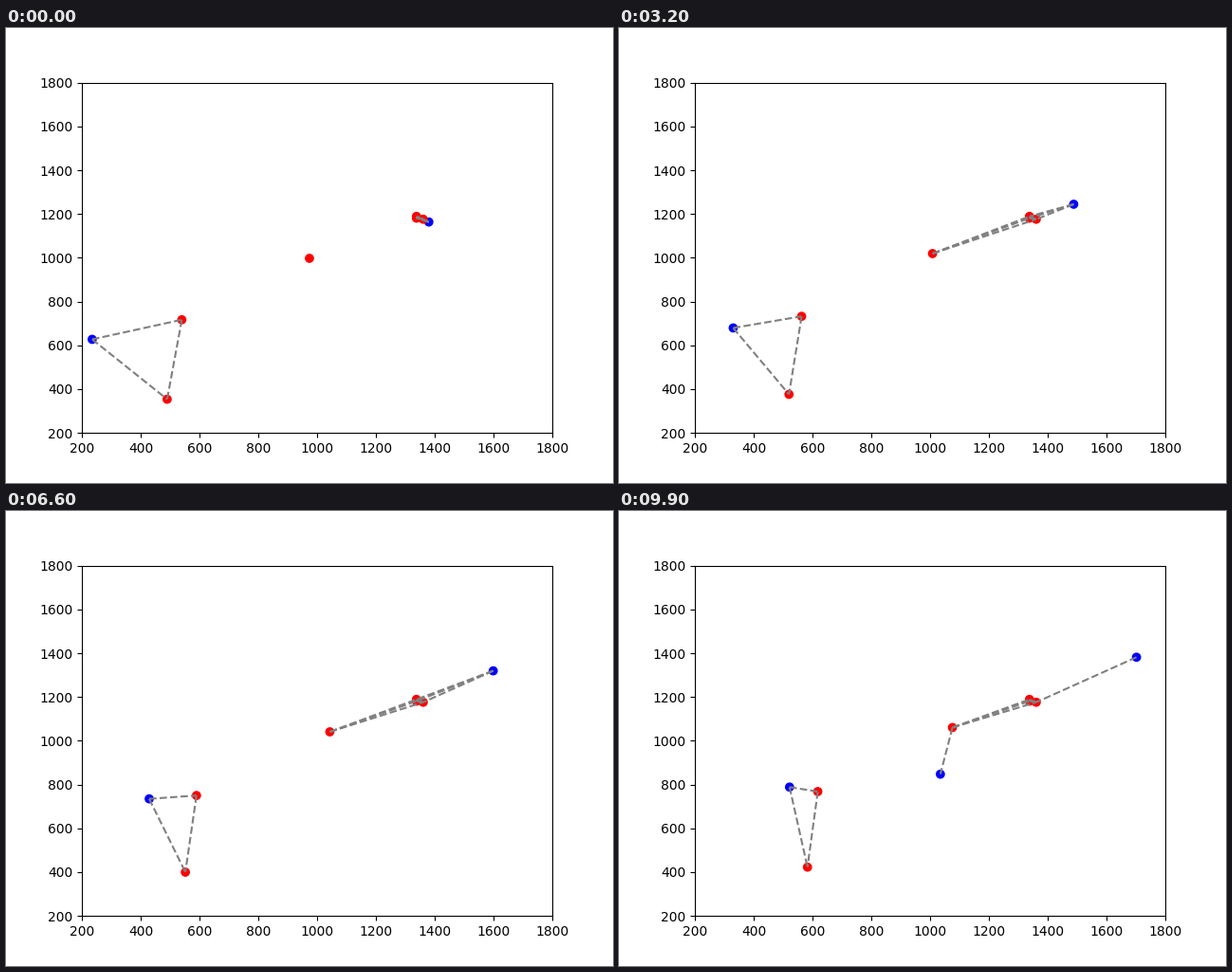
Recreate the animation shown at these times as a matplotlib script. Size 640 by 480 pixels, loop 10000 ms.

```python
from itertools import combinations

import matplotlib.pyplot as plt
import numpy as np
from matplotlib.animation import FuncAnimation

FRAMES = 100
RANGE = 400        # nodes closer than this are linked
JOIN = 94          # step at which the late node appears


def node(color, start, end=None, bow=(0, 0)):
    """A node going from start to end, its path bent by bow at half time."""
    start = np.array(start, float)
    end = start if end is None else np.array(end, float)
    return color, start, end, np.array(bow, float)


NODES = [
    node("blue", (235, 627.5), (522, 788.5), bow=(3, 0)),
    node("red", (540, 717), (618, 768), bow=(-2.5, -1)),
    node("red", (490, 354), (583, 423)),
    node("red", (974, 997.5), (1076, 1060.5), bow=(1.5, 1.5)),
    node("blue", (1380, 1163.5), (1702, 1381.5), bow=(5, 12)),
    node("red", (1338, 1189)),
    node("red", (1338, 1181)),
    node("red", (1361, 1176)),
    node("blue", (1035, 847.5)),
]


def positions(step):
    u = step / (FRAMES - 1)
    pos = np.array([start + (end - start) * u + bow * 4 * u * (1 - u)
                    for _, start, end, bow in NODES])
    if step < JOIN:
        pos[-1] = np.nan
    return pos


fig, ax = plt.subplots(figsize=(6.4, 4.8), dpi=100)
ax.set_xlim(200, 1800)
ax.set_ylim(200, 1800)

dots = ax.scatter(*positions(0).T, c=[color for color, *_ in NODES],
                  plotnonfinite=True)
links = [ax.plot([], [], "--", color="gray")[0]
         for _ in combinations(NODES, 2)]


def update(step):
    pos = positions(step)
    dots.set_offsets(pos)
    for line, (a, b) in zip(links, combinations(pos, 2)):
        near = np.hypot(*(a - b)) < RANGE
        line.set_data(*(zip(a, b) if near else ([], [])))
    return [dots, *links]


anim = FuncAnimation(fig, update, frames=FRAMES, interval=100,
                     repeat=True, repeat_delay=0)
plt.show()
```
